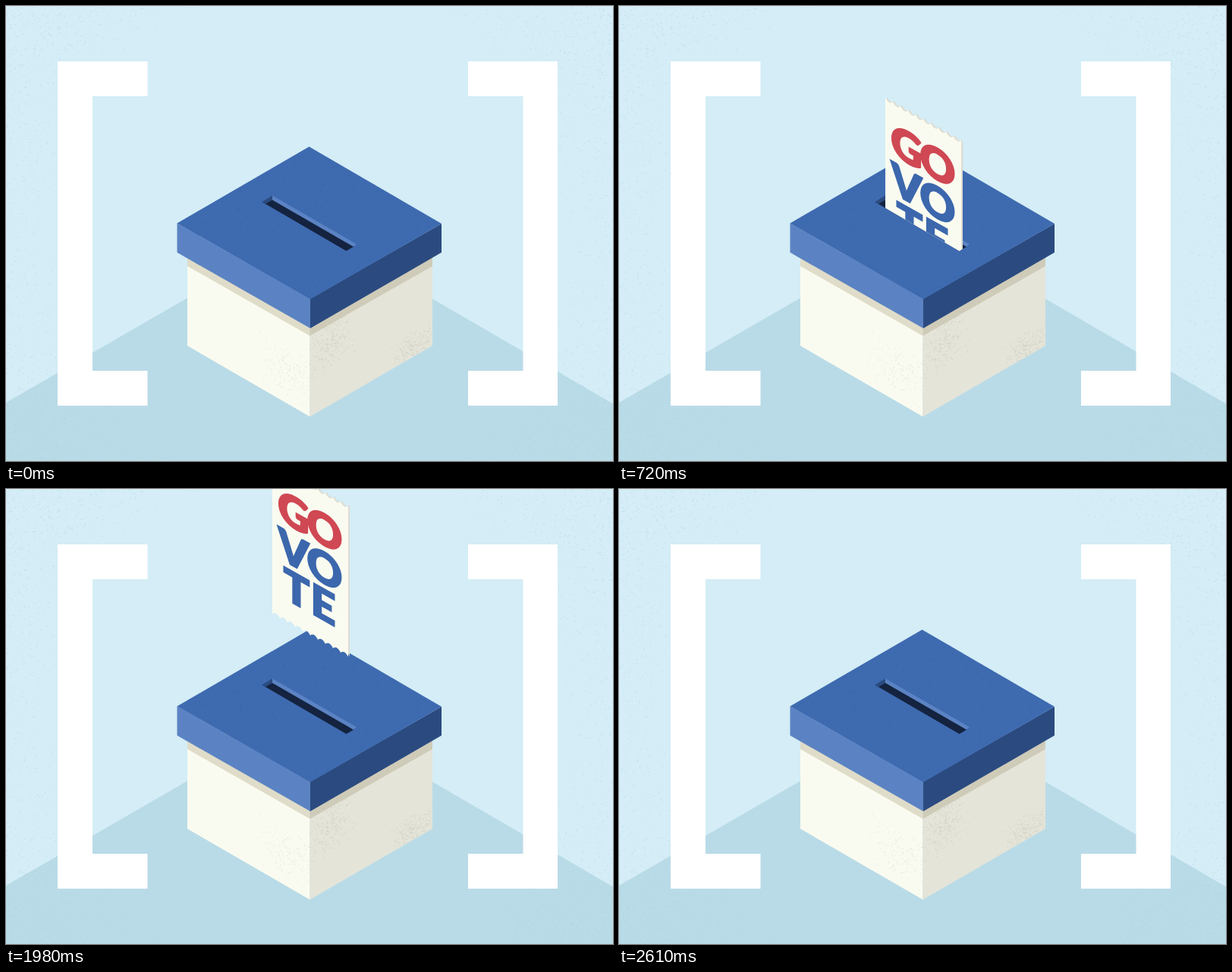
Animation of 800x600 px, one loop 2.7 s. Source, as an HTML page:

```html
<!DOCTYPE html>
<html lang="en">
<head>
<meta charset="utf-8">
<title>Go vote</title>
<style>
  html, body { margin: 0; width: 100%; height: 100%; overflow: hidden; background: #d4edf6; }
  svg { display: block; width: 100vw; height: 100vh; }
  text { font: 900 58px Lato, "Open Sans", sans-serif; text-anchor: middle; stroke-width: 1.4; }
  .red { fill: #cf4853; stroke: #cf4853; }
  .blue { fill: #3c67ad; stroke: #3c67ad; }
  .grain path { fill: none; stroke-width: 1.2; }
</style>
</head>
<body>
<svg viewBox="0 0 800 600" xmlns="http://www.w3.org/2000/svg">
  <defs>
    <clipPath id="above-slot"><path d="M300-400H500V293L458 317.5 448.500 323 342 261H300Z"/></clipPath>
    <clipPath id="lid-top"><path d="M399.500 185.500 574 287 401 386.500 225.500 286.500Z"/></clipPath>
    <clipPath id="body"><path d="M239 343 400.500 435 562 343V448L400.500 541.500 239 448Z"/></clipPath>
  </defs>

  <rect width="800" height="600" fill="#d4edf6"/>
  <path d="M0 523 400 292 800 524.500V600H0Z" fill="#b9dbe7"/>
  <g class="grain" id="room-grain"></g>
  <path d="M68 73H186.500V119H114V481H186.500V527H68ZM727 73H609V119H681.500V481H609V527H727Z" fill="#fff"/>

  <path d="M239 325 400.500 418V541.500L239 448Z" fill="#fafbf0"/>
  <path d="M562 325 400.500 418V541.500L562 448Z" fill="#e4e4d9"/>
  <path d="M239 325V343L400.500 435V418Z" fill="#dfdcc9"/>
  <path d="M562 325V343L400.500 435V418Z" fill="#cfcbb9"/>
  <g class="grain" id="body-grain" clip-path="url(#body)"></g>

  <path d="M225.500 286.500 401 386V425L225.500 325Z" fill="#5b83c3"/>
  <path d="M574 287 401 386V425L574 325Z" fill="#2b4b80"/>
  <path d="M399.500 185.500 574 287 401 386.500 225.500 286.500Z" fill="#3e6ab0"/>
  <g class="grain" id="lid-grain" clip-path="url(#lid-top)"></g>

  <path d="M337 258.500 351 250V256.500L342 261.500Z" fill="#2b4b80"/>
  <path d="M351 250 462 314 457.500 317.500 351 256.500Z" fill="#5b83c3"/>
  <path d="M342 261 351 255.700 458 317.500 448.500 323Z" fill="#14233f"/>

  <g clip-path="url(#above-slot)">
    <g id="ticket">
      <path class="paper" transform="translate(2 -2)" fill="#dedbd0"/>
      <path class="paper" fill="#fafbf0"/>
      <text class="red" x="28 69" y="70">GO</text>
      <text class="blue" x="28 69" y="120.500">VO</text>
      <text class="blue" x="32 67" y="169.500">TE</text>
    </g>
  </g>
</svg>
<script>
const LOOP = 2700, STEP = 30;
const ticket = document.getElementById('ticket');

// Ticket outline with ten concave bites along the top and bottom edges.
const bites = (dx, depth) => `q${dx / 2} ${depth} ${dx} 0`.repeat(10);
const outline = `M0 0${bites(10, 7)}V199${bites(-10, -7)}Z`;
document.querySelectorAll('.paper').forEach(p => p.setAttribute('d', outline));

let seed = 7;
const random = () => (seed = (seed * 16807) % 2147483647) / 2147483647;

function addGrain(id, color, opacity, count, pick) {
  let d = '';
  for (let i = 0; i < count; i++) {
    const spot = pick();
    if (spot) d += `M${spot[0].toFixed(1)} ${spot[1].toFixed(1)}l1.300 .5`;
  }
  const path = document.createElementNS('http://www.w3.org/2000/svg', 'path');
  path.setAttribute('d', d);
  path.setAttribute('stroke', color);
  path.setAttribute('opacity', opacity);
  document.getElementById(id).append(path);
}

// Specks gathering around a centre, denser in the middle.
const cluster = (x, y, rx, ry, slope) => () => {
  const u = random() + random() - 1, v = random() + random() - 1;
  return [x + u * rx, y + v * ry + u * rx * slope];
};

addGrain('room-grain', '#9bbfca', .3, 14000, () => {
  const x = random() * 800, y = random() * 600;
  const reach = Math.hypot(x - 400, y - 300) - 330;
  return random() < reach / 170 && [x, y];
});
addGrain('body-grain', '#c9c6b8', .55, 220, cluster(430, 445, 35, 38, -.58));
addGrain('body-grain', '#c9c6b8', .55, 220, cluster(538, 450, 35, 24, -.58));
addGrain('body-grain', '#dcdccf', .5, 150, cluster(370, 482, 45, 40, .58));
addGrain('lid-grain', '#345c9e', .45, 700, () => [225 + random() * 350, 185 + random() * 200]);

// Vertical distance of the ticket from its resting place, or null when out of sight.
function ticketOffset(t) {
  if (t >= 150 && t < 300) return -256 + 92 * (t - 150) / STEP;
  if (t >= 630 && t < 1740) return 225 * Math.max(0, 1 - (t - 600) / 510) ** 5;
  if (t >= 1740 && t < 2220) {
    const p = (t - 1740) / 480, pull = 4.42;
    return 225 * p * p * ((pull + 1) * p - pull);
  }
  return null;
}

const start = performance.now();
function draw(now) {
  const t = Math.max(0, now - start) % LOOP;
  const offset = ticketOffset(Math.floor(t / STEP) * STEP);
  ticket.style.display = offset === null ? 'none' : '';
  if (offset !== null) ticket.setAttribute('transform', `matrix(1 .565 0 1 351 ${62 + offset})`);
  requestAnimationFrame(draw);
}
draw(start);
</script>
</body>
</html>
```
